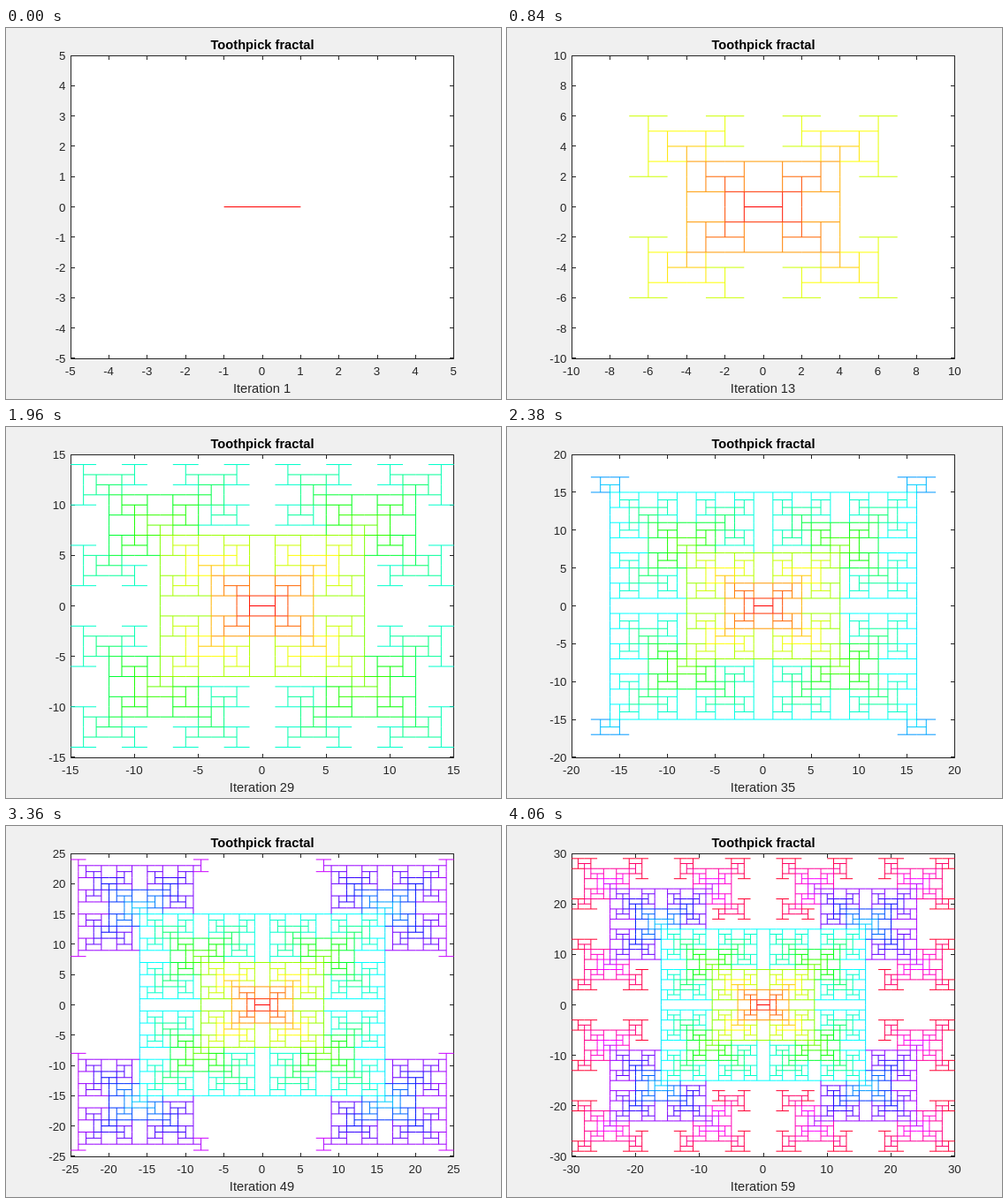
An HTML page with a canvas that plays this animation: 560 by 420 pixels, repeating every 4.13 s.

```html
<!DOCTYPE html>
<html lang="en">
<head>
<meta charset="utf-8">
<title>Toothpick fractal</title>
<style>
html, body { margin: 0; width: 560px; height: 420px; overflow: hidden; background: #f0f0f0; }
canvas { display: block; }
</style>
</head>
<body>
<canvas width="560" height="420"></canvas>
<script>
const STEPS = 59, STEP_MS = 70;
const CX = 290, CY = 202.5, HALF_W = 216.8, HALF_H = 171.4;
const LEFT = 73.5, RIGHT = 506.5, TOP = 31.5, BOTTOM = 374.5, TICK = 4.5;
const INK = '#262626', FONT = '"Liberation Sans", Arial, sans-serif';
const ctx = document.querySelector('canvas').getContext('2d');

// Each stage puts a perpendicular toothpick on every end touched only once.
function grow() {
  const touches = new Map();
  const touch = (x, y) => {
    const key = x + ',' + y;
    touches.set(key, (touches.get(key) || 0) + 1);
  };
  const stages = [];
  let centres = [[0, 0]];
  for (let i = 0; i < STEPS; i++) {
    const dx = i % 2 ? 0 : 1, dy = 1 - dx;
    stages.push({ centres, dx, dy });
    const ends = centres.flatMap(([x, y]) => [[x - dx, y - dy], [x + dx, y + dy]]);
    [...centres, ...ends].forEach(p => touch(...p));
    centres = ends.filter(([x, y]) => touches.get(x + ',' + y) === 1);
  }
  return stages;
}

const stages = grow();

function line(x1, y1, x2, y2) {
  ctx.moveTo(x1, y1);
  ctx.lineTo(x2, y2);
}

function text(str, x, y, align, font, color = INK) {
  ctx.font = font + ' ' + FONT;
  ctx.textAlign = align;
  ctx.fillStyle = color;
  ctx.fillText(str, x, y);
}

function drawAxes(lim) {
  const step = lim < 15 ? lim / 5 : lim < 30 ? 5 : 10;
  ctx.fillStyle = '#fff';
  ctx.fillRect(LEFT, TOP, RIGHT - LEFT, BOTTOM - TOP);
  ctx.strokeStyle = INK;
  ctx.beginPath();
  ctx.rect(LEFT, TOP, RIGHT - LEFT, BOTTOM - TOP);
  for (let v = Math.ceil(-lim / step) * step; v <= lim; v += step) {
    const px = CX + v / lim * HALF_W, py = CY - v / lim * HALF_H;
    const x = Math.floor(px) + .5, y = Math.floor(py) + .5;
    line(x, TOP, x, TOP + TICK);
    line(x, BOTTOM, x, BOTTOM - TICK);
    line(LEFT, y, LEFT + TICK, y);
    line(RIGHT, y, RIGHT - TICK, y);
    text(v, px - .5, 393, 'center', '13.33px');
    text(v, 67.5, Math.round(py + 5), 'right', '13.33px');
  }
  ctx.stroke();
}

function drawStage({ centres, dx, dy }, i, lim) {
  const sx = HALF_W / lim, sy = HALF_H / lim;
  ctx.strokeStyle = `hsl(${i * 6} 100% 50%)`;
  ctx.beginPath();
  for (const [x, y] of centres) {
    line(CX + (x - dx) * sx, CY - (y - dy) * sy, CX + (x + dx) * sx, CY - (y + dy) * sy);
  }
  ctx.stroke();
}

function draw(n) {
  const lim = Math.floor(n / 10) * 5 + 5;
  ctx.fillStyle = '#f0f0f0';
  ctx.fillRect(0, 0, 560, 420);
  drawAxes(lim);
  text('Toothpick fractal', 290, 24, 'center', 'bold 14.67px', '#000');
  text('Iteration ' + n, 289.5, 413, 'center', '14.67px');
  ctx.save();
  ctx.beginPath();
  ctx.rect(73, 31, 434, 344);
  ctx.clip();
  stages.slice(0, n).forEach((stage, i) => drawStage(stage, i, lim));
  ctx.restore();
}

let shown = 0;
function tick() {
  const n = Math.floor(performance.now() / STEP_MS) % STEPS + 1;
  if (n !== shown) draw(shown = n);
  requestAnimationFrame(tick);
}
tick();
</script>
</body>
</html>
```
